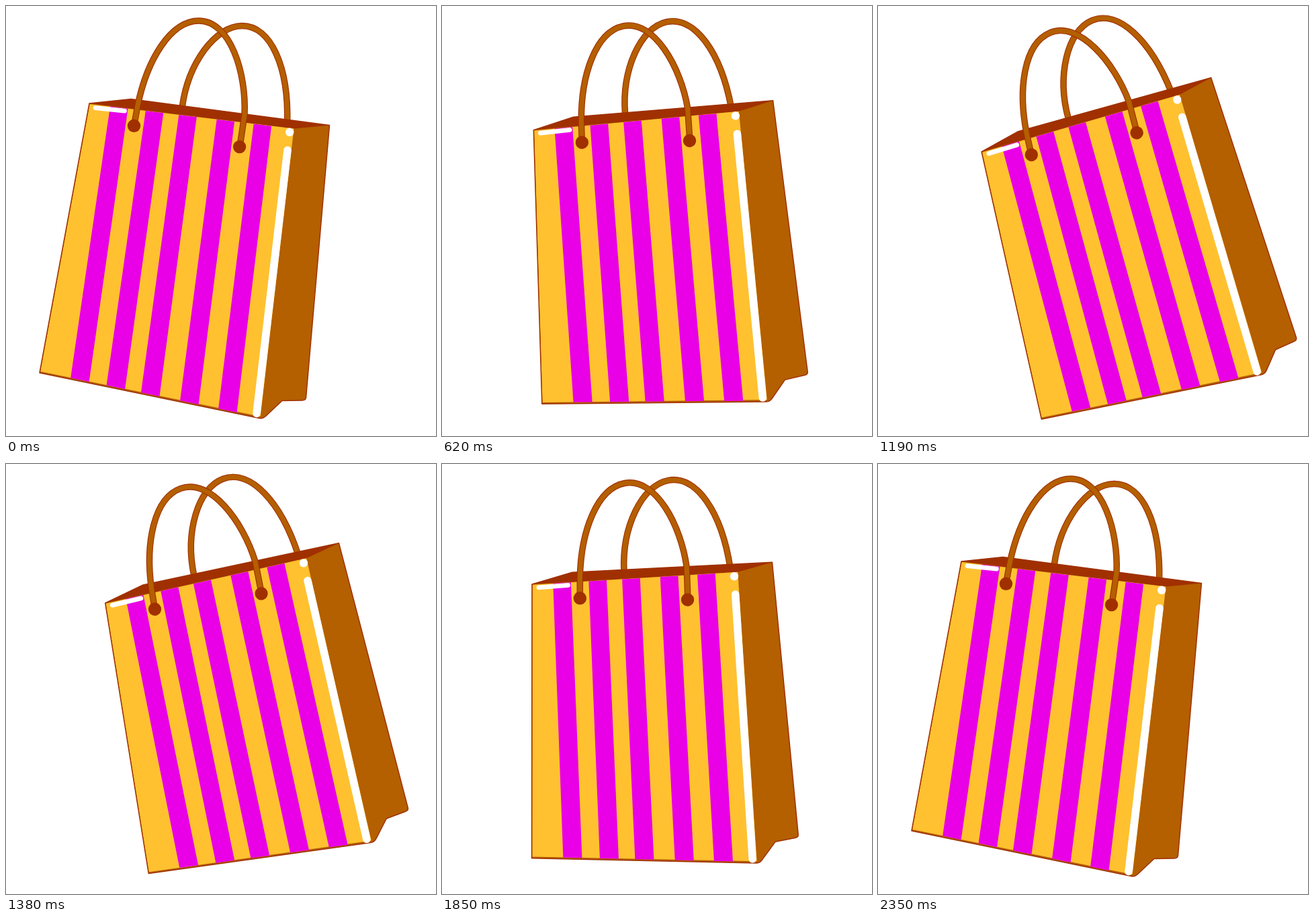
An HTML page with a canvas that plays this animation: 640x640 px, repeating every 2.39 s.

```html
<!DOCTYPE html>
<html>
<head>
<meta charset="utf-8">
<title>Swinging shopping bag</title>
<style>
html, body { margin: 0; width: 100%; height: 100%; overflow: hidden; background: #fff; }
canvas { display: block; width: 100vw; height: 100vh; }
</style>
</head>
<body>
<canvas id="stage" width="640" height="640"></canvas>
<script>
const ctx = document.getElementById('stage').getContext('2d');
const LOOP = 2390, FRAMES = 62;
const PIVOT = { x: 315.3, y: 107.2 };
const ORANGE = '#ffc130', MAGENTA = '#e900e6', BROWN = '#b45f00', DARK = '#a03000', WHITE = '#fff';

const bagOutline = new Path2D('M124 145 L186 138.5 L481.5 177.5 L446.5 583 Q446 587 441 587 L411 587.5 L386 611 Q382 614.5 377 613.5 L50 546 Z');
const opening = new Path2D('M124 145 L186 138.5 L481.5 177.5 L428.5 182.5 Z');
const front = new Path2D('M124.5 146 L428.5 182.5 L378.5 612 L51 544.5 Z');
const frontHandle = new Path2D('M190.5 178 L196 148 C210 80 245 22 287 22 C334 22 358 100 355 162 L348 209');
const backHandle = new Path2D('M261.3 156 L262.3 150 C271 86 311 29.6 351.5 29.6 C394 29.6 421 90 418.6 175');

// Left edge of each stripe at the top and at the bottom of the front face.
const stripes = [[155, 96.2], [207.8, 149.6], [257.3, 201], [313.6, 259.1], [368.6, 316.1]];
const topY = x => 149.6 + (x - 155) * 0.121;
const bottomY = x => 553.4 + (x - 96) * 0.208;

function line(x1, y1, x2, y2, width, color) {
  ctx.beginPath();
  ctx.moveTo(x1, y1);
  ctx.lineTo(x2, y2);
  ctx.lineWidth = width;
  ctx.strokeStyle = color;
  ctx.stroke();
}

function dot(x, y, r, color) {
  ctx.beginPath();
  ctx.arc(x, y, r, 0, Math.PI * 2);
  ctx.fillStyle = color;
  ctx.fill();
}

function fill(path, color) {
  ctx.fillStyle = color;
  ctx.fill(path);
}

function stroke(path, width, color) {
  ctx.lineWidth = width;
  ctx.strokeStyle = color;
  ctx.stroke(path);
}

function handle(path) {
  stroke(path, 9.5, DARK);
  stroke(path, 7.2, BROWN);
}

function drawStripe([top, bottom]) {
  const topEnd = top + 26.5, bottomEnd = bottom + 27.5;
  ctx.beginPath();
  ctx.moveTo(top, topY(top));
  ctx.lineTo(topEnd, topY(topEnd));
  ctx.lineTo(bottomEnd, bottomY(bottomEnd));
  ctx.lineTo(bottom, bottomY(bottom));
  ctx.fillStyle = MAGENTA;
  ctx.fill();
}

function drawBag() {
  ctx.lineJoin = 'round';
  ctx.lineCap = 'butt';
  handle(backHandle);
  fill(bagOutline, BROWN);
  fill(opening, DARK);
  fill(front, ORANGE);
  line(51, 545, 379, 612, 2, BROWN);
  stroke(bagOutline, 1.5, DARK);
  stripes.forEach(drawStripe);
  ctx.lineCap = 'round';
  line(133, 151.6, 176.5, 156.2, 6.8, WHITE);
  line(419, 214.5, 373, 606.5, 11.5, WHITE);
  dot(422.2, 187.8, 6.2, WHITE);
  ctx.lineCap = 'butt';
  handle(frontHandle);
  dot(190.5, 178.3, 9.7, DARK);
  dot(347.6, 209.6, 9.7, DARK);
}

// Frames last 40 ms, with a 30 ms one about every 6.5 frames.
const frameStart = i => 40 * i - 10 * Math.floor((i + 3.45) / 6.55);

function frameAt(t) {
  let i = FRAMES - 1;
  while (i > 0 && frameStart(i) > t) i--;
  return i;
}

// Swing in degrees; one pose is skipped after every 14 frames.
function swing(i) {
  const step = i + Math.max(0, Math.floor((i - 1) / 14));
  const rise = 0.742 * step - 0.4;
  const fall = Math.min(0.705 * (65.75 - step), 0.79 * (65 - step));
  return Math.max(0, Math.min(rise, fall));
}

function render(now) {
  const angle = -swing(frameAt(now % LOOP)) * Math.PI / 180;
  ctx.setTransform(1, 0, 0, 1, 0, 0);
  ctx.fillStyle = WHITE;
  ctx.fillRect(0, 0, 640, 640);
  ctx.translate(PIVOT.x, PIVOT.y);
  ctx.rotate(angle);
  ctx.translate(-PIVOT.x, -PIVOT.y);
  drawBag();
}

const start = performance.now();
function tick() {
  render(performance.now() - start);
  requestAnimationFrame(tick);
}
tick();
</script>
</body>
</html>
```
